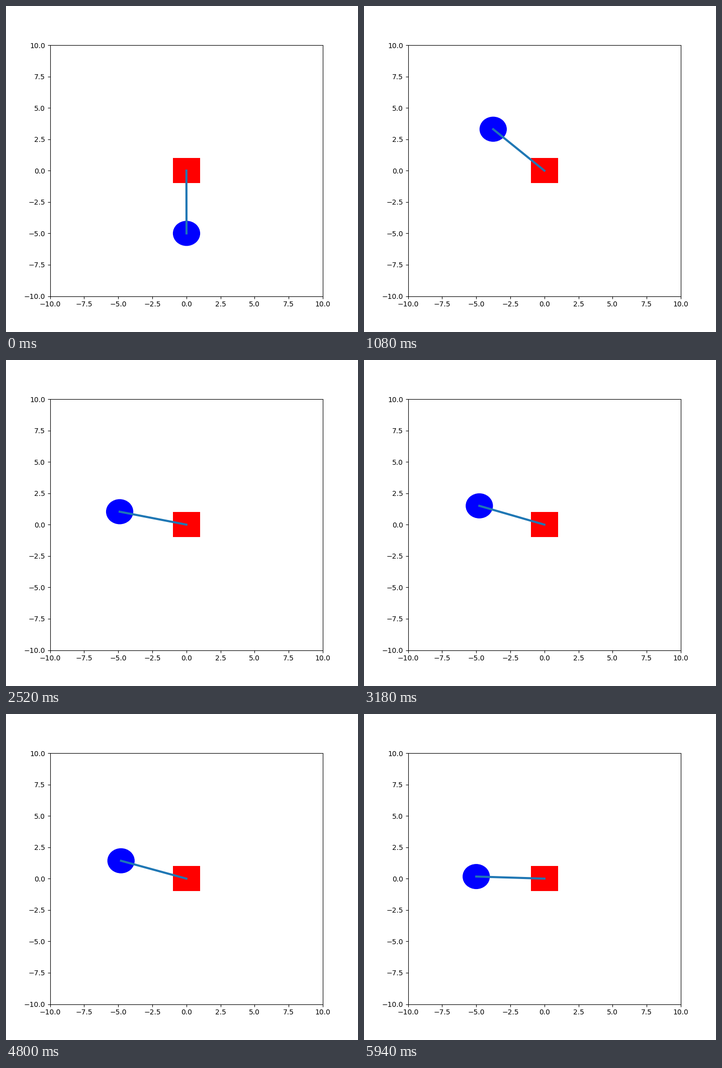
Write a matplotlib script that moves like this. It is 700 px wide and 650 px high and loops after 6000 ms.

```python
import matplotlib.pyplot as plt
import numpy as np
from itertools import pairwise
from matplotlib.animation import FuncAnimation

FRAMES = 100
INTERVAL = 60
ARM = 5

# Key poses of the swing: step, angle in degrees, degrees per step.
KEYS = [
    (1, -89.9, 3),       # hangs at rest
    (7, 14.4, 28),       # top speed
    (12, 110, 11),       # braking past the upright
    (18, 138.7, 3.5),
    (39, 168.5, 0),      # turns back
    (66, 157.3, 0),      # turns again
    (99, 178.1, 0.55),
]


def arm_angle(step):
    """Smooth cubic motion between key poses, in radians."""
    step = max(step, KEYS[0][0])
    for (s0, a0, v0), (s1, a1, v1) in pairwise(KEYS):
        if step <= s1:
            break
    h = s1 - s0
    t = (step - s0) / h
    ease = t * t * (3 - 2 * t)
    drift = h * t * (1 - t) * (v0 * (1 - t) - v1 * t)
    return np.radians(a0 + (a1 - a0) * ease + drift)


def tip(step):
    a = arm_angle(step)
    return ARM * np.cos(a), ARM * np.sin(a)


fig, ax = plt.subplots(figsize=(7, 6.5), dpi=100)
ax.set_xlim(-10, 10)
ax.set_ylim(-10, 10)

ax.add_patch(plt.Rectangle((-1, -1), 2, 2, fc="red"))
bob = ax.add_patch(plt.Circle(tip(0), 1, fc="blue"))
arm, = ax.plot([], [], color="C0", lw=3)


def update(step):
    x, y = tip(step)
    bob.center = x, y
    arm.set_data([0, x], [0, y])
    return bob, arm


anim = FuncAnimation(fig, update, frames=FRAMES, interval=INTERVAL,
                     repeat=True, repeat_delay=0)
plt.show()
```
